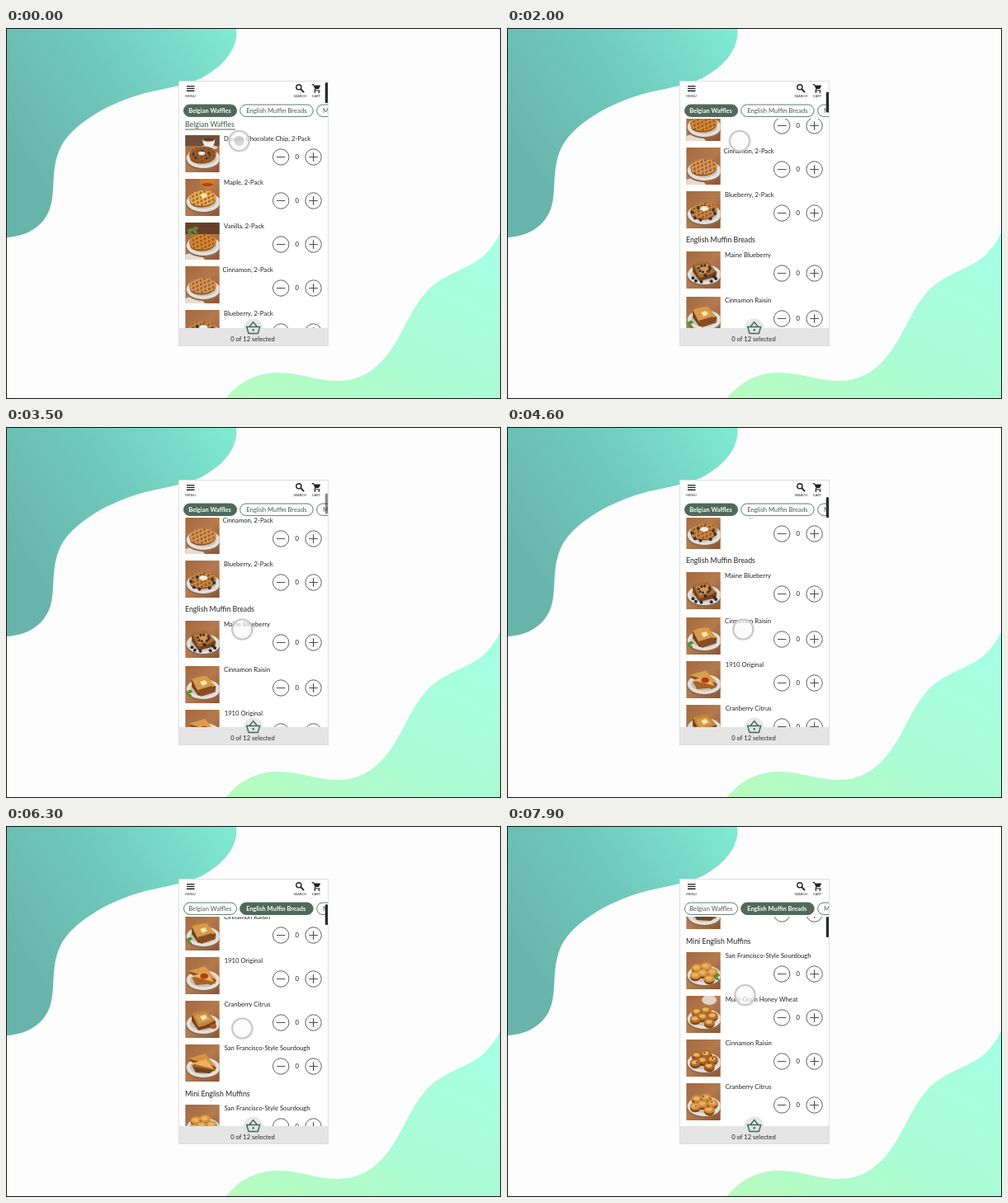
These frames come from a looping animation (600 by 450 pixels, 8000 ms). An HTML page:

```html
<!DOCTYPE html>
<html lang="en">
<head>
<meta charset="utf-8">
<title>Bread picker</title>
<style>
  html, body { margin: 0; width: 100%; height: 100%; overflow: hidden; background: #fdfdfd; }
  svg { display: block; width: 600px; height: 450px; }
  text { font-family: Lato, "Open Sans", sans-serif; font-size: 7.7px; fill: #222; }
  .mid { text-anchor: middle; }
  .tiny { font-size: 4.1px; text-anchor: middle; }
  .heading { font-size: 8.8px; }
  .line { fill: none; stroke: #222; stroke-width: 1.4; }
  .control { fill: none; stroke: #4a4f4d; stroke-width: .9; }
  .chip rect { fill: #fff; stroke: #5f7b6e; stroke-width: 1; }
  .chip text { fill: #4c5652; }
  .chip.on rect { fill: #50695d; stroke: #50695d; }
  .chip.on text { fill: #fff; font-weight: bold; font-size: 7.45px; }
</style>
</head>
<body>
<svg viewBox="0 0 600 450">
  <defs>
    <linearGradient id="teal" x1="0" y1=".6" x2="1" y2="0">
      <stop offset="0" stop-color="#68b3aa"/><stop offset=".5" stop-color="#70c9bc"/><stop offset="1" stop-color="#80ebd4"/>
    </linearGradient>
    <linearGradient id="mint" x1="0" y1="1" x2=".8" y2="0">
      <stop offset="0" stop-color="#b8fbbd"/><stop offset=".45" stop-color="#abfcd4"/><stop offset="1" stop-color="#a5ffe3"/>
    </linearGradient>
    <linearGradient id="wood" x1="0" y1="0" x2="1" y2="1">
      <stop offset="0" stop-color="#a3683f"/><stop offset=".5" stop-color="#b47a4e"/><stop offset="1" stop-color="#8f5330"/>
    </linearGradient>
    <pattern id="grid" width="5" height="4.5" patternUnits="userSpaceOnUse" patternTransform="rotate(-24) skewX(-18)">
      <rect x="1" y="1" width="3.1" height="2.7" rx=".6" fill="#7c3e12" opacity=".62"/>
    </pattern>
    <clipPath id="photo"><rect width="41.5" height="45"/></clipPath>
    <clipPath id="list"><rect x="210" y="110" width="180" height="255"/></clipPath>
    <clipPath id="screen"><rect x="210" y="65" width="180" height="320"/></clipPath>
  </defs>

  <rect width="600" height="450" fill="#fdfdfd"/>
  <path fill="url(#teal)" d="M0 0H279C282 22 268 43 240 59C219 71 186 73 155 83C121 94 80 117 66 145C53 172 61 202 52 222C44 241 25 253 0 254Z"/>
  <path fill="url(#mint)" d="M266 450C278 434 298 419 327 418C354 417 376 428 402 428C434 428 454 410 470 385C485 361 493 337 512 317C535 295 567 291 583 272C592 262 596 255 600 246V450Z"/>
  <rect x=".5" y=".5" width="599" height="449" fill="none" stroke="#111"/>

  <rect x="209.5" y="64.5" width="181" height="321" fill="#fff" stroke="#dedede"/>
  <g clip-path="url(#list)"><g id="rows"></g></g>
  <g clip-path="url(#screen)">
    <g id="chips"></g>
    <path class="line" d="M219 70.6h9.5M219 73.4h9.5M219 76.2h9.5"/>
    <text class="tiny" x="223.5" y="83.8">MENU</text>
    <circle class="line" cx="354.9" cy="71.8" r="3.1"/>
    <path class="line" style="stroke-width:1.8" d="M357.3 74.2l3.8 3.8"/>
    <text class="tiny" x="356.3" y="83.8">SEARCH</text>
    <path class="line" style="stroke-width:1.1" d="M370.7 68.6h1.9l2.5 5.2-1 1.9h6.6"/>
    <path fill="#222" d="M373 69.4h8.3l-2.2 4.6h-4.1z"/>
    <circle cx="374.4" cy="77.6" r="1.1" fill="#222"/><circle cx="379.4" cy="77.6" r="1.1" fill="#222"/>
    <text class="tiny" x="376" y="83.8">CART</text>
    <rect id="bar" x="386.8" width="3.4" height="25" rx="1.5" fill="#2b2b2b"/>
    <rect x="210" y="364" width="180" height="21.5" fill="#e5e5e6"/>
    <circle cx="299.7" cy="364" r="11.5" fill="#dfe5e3" opacity=".85"/>
    <g fill="none" stroke="#45655a" stroke-width="1.5" stroke-linejoin="round">
      <path d="M291.7 362.4h16l-2.3 8h-11.4zM295.3 362l4.4-5.4 4.4 5.4"/>
      <circle cx="299.7" cy="366.3" r=".9" fill="#45655a" stroke-width="1"/>
    </g>
    <text class="mid" style="font-size:7.6px" x="299" y="380">0 of 12 selected</text>
  </g>
  <g id="cursor">
    <circle r="14" fill="#888" opacity=".1"/>
    <circle r="12" fill="#fff" fill-opacity=".68" stroke="#c9c9c9" stroke-width="2.2"/>
    <circle id="press" r="6" fill="#aaa" opacity=".45"/>
  </g>
</svg>

<script>
const $ = id => document.getElementById(id);
const LOOP = 8000, STEP = 100;

const oval = (x, y, rx, ry, fill) => `<ellipse cx="${x}" cy="${y}" rx="${rx}" ry="${ry}" fill="${fill}"/>`;
const shape = (d, fill) => `<path d="${d}" fill="${fill}"/>`;
const dots = (n, cx, cy, rx, ry, r, fill) => Array.from({ length: n }, (_, i) =>
  oval(cx + rx * Math.cos(i * 2.4), cy + ry * Math.sin(i * 2.4), r, r, fill)).join('');
const plate = oval(22, 30, 21, 12, '#8a6a50') + oval(22, 28, 20.5, 12, '#e4dfd8') + oval(22, 27.5, 16, 9, '#c9bfb3');

function waffle(color, extra = '') {
  const d = 'M5 25Q6 18 17 16Q31 13 37 21Q39 29 29 33Q15 37 7 31Z';
  return plate + shape(d, '#8d4c1b') + `<g transform="translate(0 -1.5)">${shape(d, color)}${shape(d, 'url(#grid)')}</g>` + extra;
}
function toast(color, extra = '') {
  return plate + shape('M8 17L26 13L37 25L36 31L16 36L8 25Z', '#74401d') +
    shape('M8 16Q17 12 26 12L36 24Q26 30 16 32Z', color) +
    shape('M12 18L25 15L32 23L17 28Z', '#d59a51') + extra;
}
function triangles(color, extra = '') {
  return plate + shape('M4 19L24 12L38 29L31 34Z', '#8e4d1d') + shape('M4 17L24 11L37 27Z', color) +
    shape('M8 25L25 20L37 32L13 34Z', '#a86226') + shape('M8 23L25 18L35 30Z', '#e8b264') + extra;
}
function muffins(color, extra = '') {
  const spots = [[13, 19], [24, 17], [32, 24], [20, 25], [11, 28], [28, 32]];
  return plate + spots.map(([x, y]) => oval(x, y + 2, 6.5, 5.2, '#854618') +
    oval(x, y, 6.5, 4.6, color) + oval(x - .5, y - .5, 3.8, 2.3, '#e8b464')).join('') + extra;
}
const butter = shape('M18 19l6-2 3 4-6 3z', '#f5e5ae');
const leaf = (x, y) => shape(`M${x} ${y}q5-6 8-1q-3 4-8 1M${x + 1} ${y + 1}q6 0 6 4q-5 1-6-4`, '#618a35');
const berries = dots(8, 21, 27, 14, 8, 2, '#303449');
const cloth = shape('M0 39Q14 33 24 45H0Z', '#e6ddd2');

// Each row: list position, label, picture, label x
const items = [
  [130, 'Double Chocolate Chip, 2-Pack', shape('M0 0H42V13H0Z', '#71503b') + oval(29, 15, 10, 3, '#d8d3cd') +
    shape('M21 5H36Q36 15 29 15Q21 15 21 5Z', '#efebe6') + oval(28.5, 5.5, 7, 2, '#6a3b20') +
    waffle('#996034', dots(6, 20, 24, 10, 5, 1.3, '#452414') + oval(20, 22, 4, 2.3, '#f1e7d8'))],
  [183, 'Maple, 2-Pack', shape('M17 0H38L34 10Q26 14 20 9Z', '#d7792b') + oval(27, 7, 7, 2, '#a64b16') + waffle('#e9ad50', butter)],
  [236, 'Vanilla, 2-Pack', shape('M0 0H42V14H0Z', '#674029') + cloth + waffle('#d78a34') + leaf(2, 10) + leaf(8, 8)],
  [289, 'Cinnamon, 2-Pack', cloth + waffle('#d69758'), 262.5],
  [342, 'Blueberry, 2-Pack', waffle('#c98841', berries + oval(22, 21, 5, 3, '#f4eee0'))],
  [415, 'Maine Blueberry', toast('#a66a32', dots(9, 22, 21, 7, 4, 1.7, '#463137') + dots(7, 22, 33, 14, 4, 2, '#292c3c'))],
  [470, 'Cinnamon Raisin', toast('#d99a43', butter + shape('M15 29L32 24L37 31L19 37Z', '#884c24')) + leaf(1, 32)],
  [523, '1910 Original', triangles('#d99c4c', oval(23, 23, 5, 3.5, '#b43d16'))],
  [576, 'Cranberry Citrus', toast('#c88337', butter) + oval(34, 31, 4, 3, '#b9521c')],
  [629, 'San Francisco-Style Sourdough', triangles('#d69242', shape('M9 27L34 31L30 35L13 34Z', '#704421'))],
  [702, 'San Francisco-Style Sourdough', muffins('#d7963d', leaf(33, 29))],
  [755, 'Multi-Grain Honey Wheat', oval(28, 5, 9, 6, '#e0d5c8') + muffins('#ba712d')],
  [808, 'Cinnamon Raisin', muffins('#b36625', dots(7, 21, 23, 11, 7, 1, '#602d16'))],
  [861, 'Cranberry Citrus', muffins('#d08c3b', dots(6, 20, 23, 11, 7, 1.1, '#94401f'))]
];

const row = ([y, label, picture, x = y > 500 ? 264.7 : 264]) => `
  <g transform="translate(0 ${y})">
    <g transform="translate(217.2 0)" clip-path="url(#photo)"><rect width="42" height="45" fill="url(#wood)"/>${picture}</g>
    <text x="${x}" y="6.9">${label}</text>
    <circle class="control" cx="333.2" cy="26.5" r="9.7"/><circle class="control" cx="372.6" cy="26.5" r="9.7"/>
    <path class="control" style="stroke-width:1.2" d="M328 26.5h10.4M367.3 26.5h10.6M372.6 21.2v10.6"/>
    <text class="mid" x="352.8" y="29.3">0</text>
  </g>`;

$('rows').innerHTML = `
  <text class="heading" x="217" y="120.2" style="fill:#40594e">Belgian Waffles</text>
  <path d="M217 123h61" stroke="#50695d" stroke-width="1"/>
  <text class="heading" x="217" y="404.3">English Muffin Breads</text>
  <text class="heading" x="217" y="692.3">Mini English Muffins</text>` + items.map(row).join('');

$('chips').innerHTML = [[215.5, 64, 'Belgian Waffles', 221.2], [283.7, 88.5, 'English Muffin Breads', 291.2],
  [376.7, 85, 'Mini English Muffins', 384]].map(([x, w, label, tx]) =>
  `<g class="chip"><rect x="${x}" y="93" width="${w}" height="14.4" rx="7.2"/><text x="${tx}" y="103">${label}</text></g>`).join('');
const chips = [...document.querySelectorAll('.chip')];

// Piecewise linear track of [time, value] keys
function track(keys, t) {
  const i = keys.findIndex(k => k[0] > t);
  if (i < 0) return keys[keys.length - 1][1];
  if (i === 0) return keys[0][1];
  const [t0, a] = keys[i - 1], [t1, b] = keys[i];
  return a + (b - a) * (t - t0) / (t1 - t0);
}
const scrollKeys = [[0, 0], [1100, 66], [2000, 144], [2500, 180], [3500, 180], [4600, 239], [6300, 364], [7600, 549]];
const cursorX = [[0, 282.6], [300, 282], [2600, 282], [3200, 286.3], [7500, 286.3], [7900, 288.5]];
const cursorY = [[0, 137], [2600, 137], [3200, 245.5], [7500, 245.5], [7900, 205]];
const barFade = [[3200, 1], [3500, .55], [3600, 1]];

function draw(t) {
  const y = track(scrollKeys, t);
  $('rows').setAttribute('transform', `translate(0 ${-y})`);
  $('bar').setAttribute('y', 66 + y * .08);
  $('bar').setAttribute('opacity', track(barFade, t));
  $('cursor').setAttribute('transform', `translate(${track(cursorX, t)} ${track(cursorY, t)})`);
  $('press').setAttribute('opacity', t < 200 ? .45 : 0);
  const active = y < 290 ? 0 : 1;
  chips.forEach((chip, i) => chip.classList.toggle('on', i === active));
}

const start = performance.now();
function tick() {
  const t = (performance.now() - start) % LOOP;
  draw(Math.floor(t / STEP) * STEP);
  requestAnimationFrame(tick);
}
tick();
</script>
</body>
</html>
```
